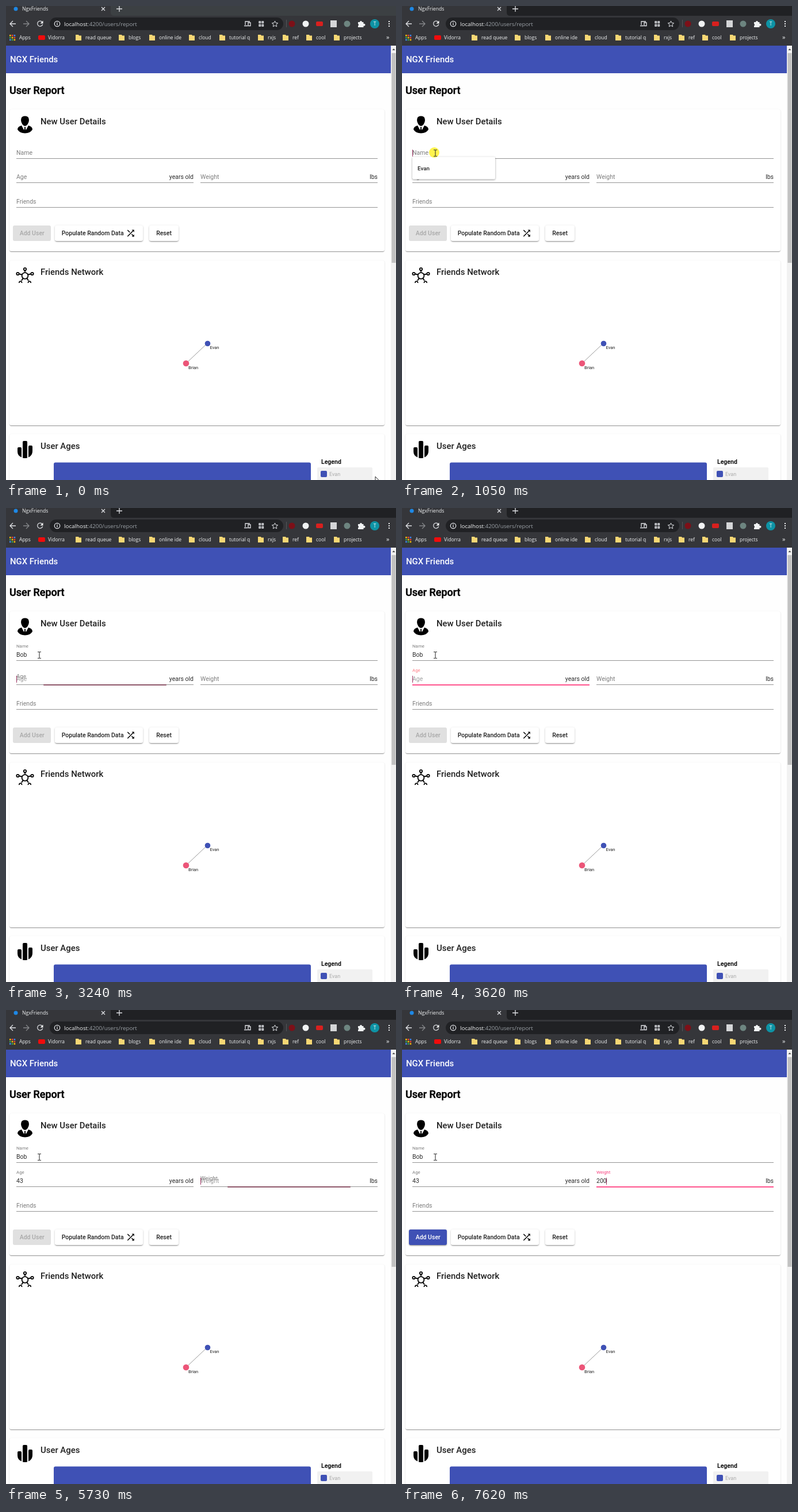
Write an HTML page that moves like this. It is 678x825 px and loops after 8000 ms.

```html
<!DOCTYPE html>
<html lang="en">
<head>
<meta charset="utf-8">
<title>User Report</title>
<style>
html, body { margin: 0; width: 100%; height: 100%; overflow: hidden; background: #fff; }
#stage { position: relative; width: 678px; height: 825px; overflow: hidden; background: #fefefe; }
#stage > * { position: absolute; }
svg { left: 0; top: 0; font: 10.5px Roboto, sans-serif; }
.card, .button { box-sizing: border-box; background: #fff; border-radius: 3px; }
.card { left: 6px; width: 652px;
  box-shadow: 0 1.5px .75px -.75px rgba(0,0,0,.3), 0 .75px .75px rgba(0,0,0,.2), 0 .75px 2.2px rgba(0,0,0,.14); }
.button { top: 382px; height: 27px; box-shadow: 0 2px 1px -1.5px rgba(0,0,0,.25), 0 1.5px 1.5px rgba(0,0,0,.18), 0 .75px 3.5px rgba(0,0,0,.16); }
.chrome { font-family: "Open Sans", sans-serif; font-size: 8.5px; fill: #f1f3f4; }
.title { font-size: 14.9px; font-weight: 500; fill: #212121; }
.medium { font-weight: 500; fill: #212121; }
.small { font-size: 7.5px; fill: #222; }
.icon { fill: none; stroke: #dfe1e5; stroke-width: 1.3; }
</style>
</head>
<body>
<div id="stage">
  <div class="card" style="top:180px;height:247px"></div>
  <div class="card" style="top:443px;height:287px"></div>
  <div class="card" style="top:745px;height:100px"></div>
  <div class="button" id="add" style="left:12px;width:66px"></div>
  <div class="button" style="left:85px;width:153px"></div>
  <div class="button" style="left:249px;width:51px"></div>

  <svg width="678" height="825" viewBox="0 0 678 825">
    <!-- browser -->
    <g class="chrome">
      <path fill="#35363a" d="M0 0H678V69H0Z"/>
      <path id="tabStrip" d="M182 0H678V17H188Q182 17 182 11Z"/>
      <circle cx="17" cy="5" r="3.5" fill="#1e88e5"/>
      <text x="28" y="8" font-size="8.6">NgxFriends</text>
      <path class="icon" d="M166 2l6 6M172 2l-6 6M192 5h10M197 0v10"/>
      <rect x="76" y="20" width="406" height="22" rx="11" fill="#202124"/>
      <path class="icon" d="M17 31H7M12 26l-5 5 5 5"/>
      <path class="icon" style="stroke:#85878a" d="M30 31h10M35 26l5 5-5 5"/>
      <path class="icon" d="M63 28a4.6 4.6 0 1 0 .7 4"/>
      <path d="M64.5 25.5v5h-5z"/>
      <circle class="icon" cx="89" cy="31" r="4.7"/>
      <path class="icon" d="M89 30v3.6M89 28v1.2"/>
      <text x="101" y="34.5" font-size="9.8">localhost<tspan fill="#9aa0a6">:4200/users/report</tspan></text>
      <path class="icon" d="M416 33v-6h8M414 34.5h6M421 29h4v5.5h-4z"/>
      <path class="icon" d="M440 27h2.5v2.5H440zM445 27h2.5v2.5H445zM440 32.5h2.5V35H440zM445 32.5h2.5V35H445z"/>
      <path class="icon" d="M467.5 26l1.5 3.4 3.7.4-2.8 2.4.8 3.7-3.2-1.9-3.2 1.9.8-3.7-2.8-2.4 3.7-.4z" style="stroke-width:1"/>
      <path d="M487.5 24v13" stroke="#55565a"/>
      <circle cx="497" cy="31" r="5.5" fill="#7d1018"/>
      <circle cx="521" cy="31" r="5.5" fill="#f1f3f4"/>
      <rect x="539" y="27" width="12" height="8" rx="2" fill="#d8201e"/>
      <rect x="564" y="25" width="11" height="12" fill="#d5d6d8"/>
      <circle cx="593" cy="31" r="5.5" fill="#6d8580"/>
      <path d="M612 28h3a2 2 0 1 1 4 0h2.5v3a2 2 0 1 1 0 3.5V37H612v-2.5a2 2 0 0 0 0-3.5z"/>
      <circle cx="641" cy="31" r="8" fill="#0e93a5"/>
      <text x="641" y="34" text-anchor="middle" fill="#fff">T</text>
      <path d="M665 26h2v2h-2zM665 30h2v2h-2zM665 34h2v2h-2z"/>
      <g id="apps"></g>
      <text x="23" y="58">Apps</text>
      <rect x="56" y="51" width="12" height="8" rx="2" fill="#f00c0c"/>
      <text x="73" y="58">Vidorra</text>
      <g id="folders"></g>
      <text x="661" y="58" font-size="11">»</text>
    </g>

    <!-- page -->
    <path fill="#3f51b5" d="M0 69H669V117H0Z"/>
    <path fill="#f1f1f1" d="M669 69h9v756h-9z"/>
    <path fill="#c1c1c1" d="M670.5 82h7v365h-7z"/>
    <path fill="#505050" d="M671.5 77l2.5-3 2.5 3z"/>
    <text x="7" y="98" class="title" style="fill:#fff">NGX Friends</text>
    <text x="6" y="153" font-size="18" font-weight="500" stroke="#000" stroke-width=".5">User Report</text>
    <text x="60" y="206" class="title">New User Details</text>
    <text x="60" y="468" class="title">Friends Network</text>
    <text x="60" y="771" class="title">User Ages</text>

    <path d="M33 191.500q7 0 7 7 0 4-2.500 7.500-2 3-4.500 3t-4.500-3q-2.500-3.500-2.500-7.500 0-7 7-7z"/>
    <path d="M27 208l6 11 6-11q7 2 7 7-4 6.500-13 6.500t-13-6.500q0-5 7-7z"/>
    <path d="M33 210.300l1.600 1.500-.9 1.300 1.200 3.500-1.900 3.400-1.900-3.400 1.200-3.500-.9-1.300z"/>
    <g fill="none" stroke="#000" stroke-width="1.800">
      <path d="M33 463.500v-3M28 467.500l-5-1M38 467.500l5-1M29.500 474l-2.500 4M36.500 474l2.500 4"/>
      <circle cx="33" cy="469.500" r="5.400"/>
      <circle cx="33" cy="458" r="2.200"/><circle cx="20.500" cy="466" r="2.200"/><circle cx="45.500" cy="466" r="2.200"/>
      <path d="M23 482a2.300 2.300 0 1 1 4.400 0M38.600 482a2.300 2.300 0 1 1 4.400 0"/>
    </g>
    <path d="M20 770q0-2 2-2h3q2 0 2 2v15.500q-7-3-7-10zM29 759q0-2 2-2h4q2 0 2 2v27.500q-4 1-8 0zM39 767q0-2 2-2h3q2 0 2 2v8q0 7.500-7 10.500z"/>

    <path d="M350 587L313 622" stroke="#999"/>
    <circle cx="350.5" cy="587.5" r="4.8" fill="#3f51b5"/>
    <circle cx="313" cy="622" r="5.3" fill="#ec5578"/>
    <text x="354.5" y="597" class="small">Evan</text>
    <text x="317" y="632" class="small">Brian</text>

    <path fill="#3f51b5" d="M83 825V797.500q0-3 3-3H527q3 0 3 3V825z"/>
    <text x="548" y="797" font-weight="700" fill="#111">Legend</text>
    <path fill="#f1f1f1" d="M541 825V805q0-2 2-2h92q2 0 2 2v20z"/>
    <rect x="547" y="809" width="11" height="11" rx="2" fill="#3f51b5"/>
    <text x="562" y="818" font-size="9" fill="#aaa">Evan</text>

    <text id="addText" x="45.2" y="398.7" class="medium" text-anchor="middle">Add User</text>
    <text x="96.7" y="398.7" class="medium">Populate Random Data</text>
    <path transform="translate(207.8 386.5) scale(.75)" d="M10.59 9.17L5.41 4 4 5.41l5.17 5.17zM14.5 4l2.04 2.04L4 18.59 5.41 20 17.96 7.46 20 9.5V4zM14.83 13.41l-1.41 1.41 3.13 3.13L14.5 20H20v-5.5l-2.04 2.04z"/>
    <text x="274.5" y="398.7" class="medium" text-anchor="middle">Reset</text>

    <g id="fields"></g>
    <g id="popup" style="filter:drop-shadow(0 1px 1.5px rgba(0,0,0,.4))">
      <rect x="18" y="262.5" width="144" height="39" rx="2" fill="#fff"/>
      <text x="27" y="285.5" font-size="9.8" class="medium">Evan</text>
    </g>
    <rect id="caret" width="1" height="12" fill="#9c3060"/>

    <circle id="click" cx="56" cy="255" r="9" fill="#fff12e"/>
    <path id="arrow" fill="#fff" stroke="#111" stroke-width=".9" d="M0 0V11.500L2.600 9 4.400 13 6.200 12.200 4.400 8.300H8z"/>
    <path id="beam" fill="none" stroke="#333" stroke-width="1.1" d="M-3-5.500h2.200L0-5 .8-5.500H3M0-5V5M-3 5.500h2.200L0 5l.8.500H3"/>
  </svg>
</div>
<script>
const LOOP = 8000;
const DARK = [34, 34, 34], PINK = [255, 64, 129], GREY = '#7d7d7d';
const $ = id => document.getElementById(id);

function make(parent, tag, attrs, text = '') {
  const el = document.createElementNS('http://www.w3.org/2000/svg', tag);
  set(el, attrs);
  el.textContent = text;
  return parent.appendChild(el);
}
function set(el, attrs) {
  for (const key in attrs) el.setAttribute(key, attrs[key]);
}
const show = (el, on) => { el.style.display = on ? '' : 'none'; };
const clamp = v => Math.min(1, Math.max(0, v));
const mix = (a, b, p) => a + (b - a) * p;
const mixColor = (from, to, p) => `rgb(${from.map((v, i) => Math.round(mix(v, to[i], p)))})`;

// cubic-bezier(.25, .8, .25, 1)
function swift(x) {
  x = clamp(x);
  let lo = 0, hi = 1;
  for (let i = 0; i < 24; i++) {
    const u = (lo + hi) / 2;
    if (.75 * u * (1 - u) + u ** 3 < x) lo = u; else hi = u;
  }
  const u = lo, v = 1 - u;
  return 2.4 * v * v * u + 3 * v * u * u + u ** 3;
}

// The screen refreshes in even steps while something moves: [from, to, steps]
const BURSTS = [[70, 850, 11], [1050, 1610, 8], [3240, 3620, 6], [5730, 6110, 6], [7130, 7620, 7]];
function held(t) {
  for (const [from, to, steps] of BURSTS) {
    if (t < from || t >= to) continue;
    const gap = (to - from) / (steps - 1);
    return from + Math.floor((t - from) / gap) * gap;
  }
  return t;
}

const BLINKS = [1610, 3080, 3770, 4310, 4780, 6270, 6810];
const FIELDS = [
  { label: 'Name', x: 18, y: 259, w: 628, focus: 1050, start: 1110, blur: 3240, pink: '#e83d78',
    keys: [[2170, 'B'], [2330, 'Bo'], [2550, 'Bob']] },
  { label: 'Age', x: 18, y: 301, w: 308, suffix: 'years old', focus: 3240, start: 3204, blur: 5730, pink: '#ff7880',
    keys: [[5030, '4'], [5250, '43']] },
  { label: 'Weight', x: 338, y: 301, w: 308, suffix: 'lbs', focus: 5730, start: 5694, blur: LOOP, pink: '#f83f7e',
    keys: [[7130, '2'], [7290, '20'], [7450, '200']] },
  { label: 'Friends', x: 18, y: 344, w: 628, focus: Infinity, start: Infinity, blur: Infinity, keys: [] }
];

for (const f of FIELDS) {
  const root = $('fields');
  make(root, 'rect', { x: f.x, y: f.y + 6, width: f.w, height: 1, fill: '#949494' });
  f.line = make(root, 'rect', { y: f.y + 6, height: 1.8 });
  f.title = make(root, 'text', {}, f.label);
  f.hint = make(root, 'text', { x: f.x, y: f.y, fill: '#a0a0a0' }, f.label);
  f.value = make(root, 'text', { x: f.x, y: f.y, fill: '#2b2b2b' });
  if (f.suffix) make(root, 'text', { x: f.x + f.w, y: f.y, fill: '#2b2b2b', 'text-anchor': 'end' }, f.suffix);
}

const DOTS = ['#ea4335', '#fbbc04', '#34a853', '#4285f4'];
for (let i = 0; i < 9; i++) {
  make($('apps'), 'rect', { x: 6 + i % 3 * 3.8, y: 50 + Math.floor(i / 3) * 3.8, width: 2.6, height: 2.6, fill: DOTS[(i * 3 + 1) % 4] });
}
const BOOKMARKS = { 'read queue': 138, blogs: 213, 'online ide': 266, cloud: 335, 'tutorial q': 388, rxjs: 455, ref: 498, cool: 539, projects: 587 };
for (const name in BOOKMARKS) {
  const x = BOOKMARKS[name];
  make($('folders'), 'path', { d: `M${x - 17} 50h5l1 1.5h4V60h-10z`, fill: '#f7d774' });
  make($('folders'), 'text', { x, y: 58 }, name);
}

function drawField(f, t) {
  const focused = t >= f.focus && t < f.blur;
  const key = f.keys.filter(([at]) => at <= t).pop();
  const rise = swift((t - f.start) / 400);
  const grow = swift((t - f.start) / 300);
  const width = f.w * mix(.5, 1, grow);

  set(f.line, {
    x: f.x + (f.w - width) / 2, width,
    fill: mixColor(DARK, PINK, grow),
    opacity: focused ? swift((t - f.start) / 100) : 0
  });
  set(f.title, {
    transform: `translate(${f.x} ${f.y - 15.7 * rise}) scale(${mix(1, .75, rise)})`,
    fill: focused && rise > .5 ? f.pink : GREY
  });
  show(f.hint, focused && t >= f.start && !key);
  f.value.textContent = key ? key[1] : '';

  if (focused) {
    const last = key ? key[0] : f.focus;
    const blinks = BLINKS.filter(at => at > last && at <= t).length;
    const end = key ? f.value.getComputedTextLength() : 0;
    set($('caret'), { x: Math.round(f.x + end - .4), y: f.y - 9 });
    show($('caret'), blinks % 2 === 0);
  }
}

function drawPointer(t) {
  const p = t < 70 ? 0 : clamp((t - 70 + 78) / 858);
  const ease = p * p * (3 - 2 * p);
  const x = mix(642, 58, ease), y = mix(819, 256, ease);
  const overInput = y < 266;
  show($('arrow'), !overInput);
  show($('beam'), overInput);
  set($(overInput ? 'beam' : 'arrow'), { transform: `translate(${x} ${y})` });
  set($('click'), { opacity: t < 1050 ? 0 : .85 * clamp((1300 - t) / 150) });
}

function drawAddButton(t) {
  const p = swift((t - 7130) / 400);
  const add = $('add');
  add.style.background = mixColor([224, 224, 224], [63, 81, 181], p);
  add.style.boxShadow = p > .001 ? '' : 'none';
  $('addText').style.fill = mixColor([168, 168, 168], [255, 255, 255], p);
}

function render(now) {
  const t = held(now % LOOP);
  // the window gains focus with the first click
  set($('tabStrip'), { fill: t < 1050 ? '#3c4043' : '#202124' });
  show($('caret'), false);
  for (const f of FIELDS) drawField(f, t);
  show($('popup'), t >= 1050 && t < 2170);
  drawPointer(t);
  drawAddButton(t);
}

function tick() {
  render(performance.now());
  requestAnimationFrame(tick);
}
tick();
</script>
</body>
</html>
```
